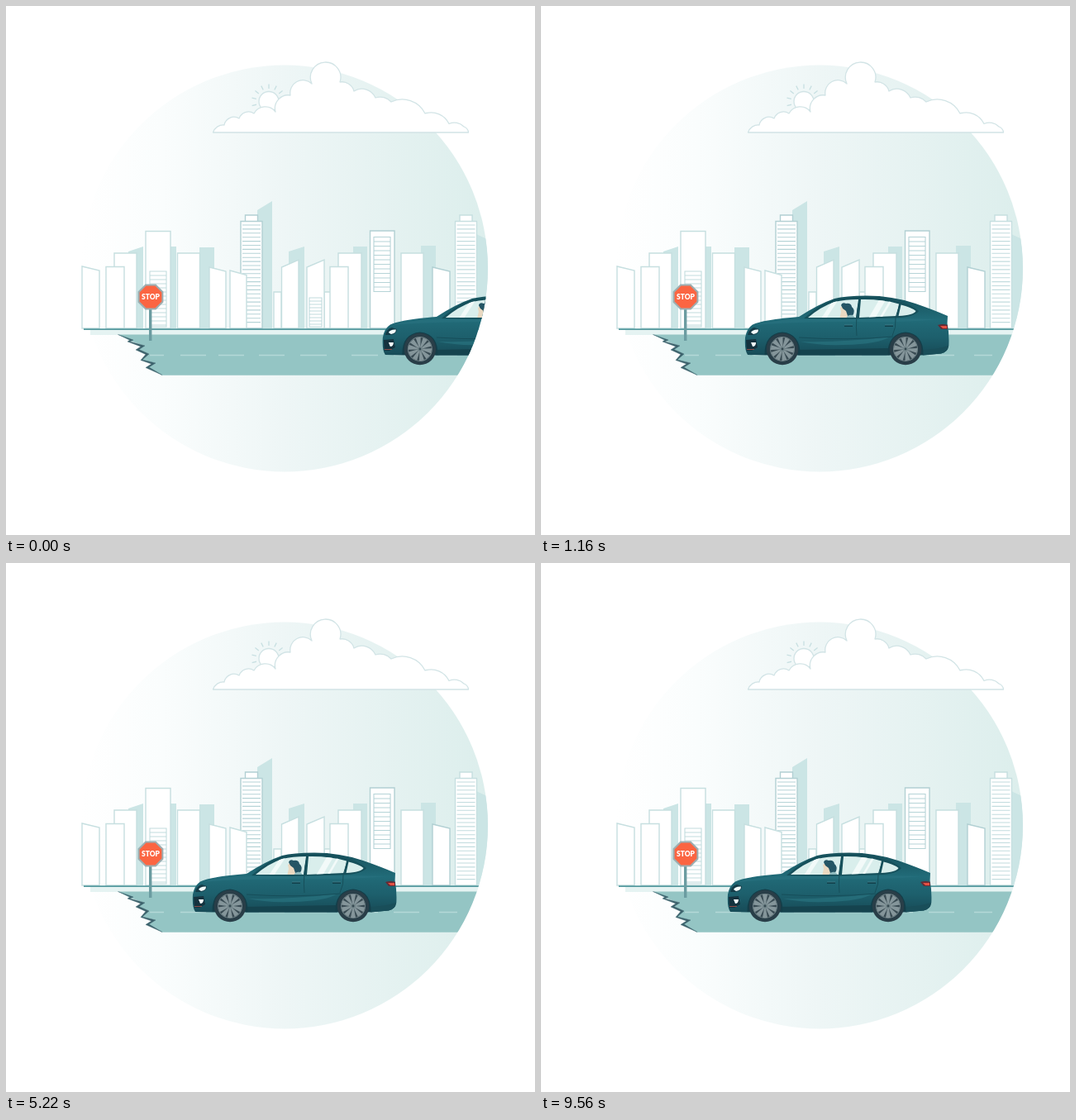
Write an HTML page that moves like this. It is 640x640 px and loops after 9580 ms.

```html
<!DOCTYPE html>
<html lang="en">
<head>
<meta charset="utf-8">
<title>Car at a broken road</title>
<style>
  html, body { margin: 0; width: 100%; height: 100%; overflow: hidden; background: #fff; }
  svg { display: block; width: 100vw; height: 100vh; }
  .block { fill: #fff; stroke: #c6dfe0; stroke-width: 1.4; }
  .bold .block { stroke: #b2d0d3; }
  .shade { fill: #cbe5e5; }
  .lines { fill: none; stroke: #c2dcde; stroke-width: 1.1; }
  .bold .lines { stroke: #b6d4d7; }
  .outline { fill: #fff; stroke: #d2e4e6; stroke-width: 1.3; stroke-linejoin: round; }
</style>
</head>
<body>
<svg viewBox="0 0 640 640">
  <defs>
    <clipPath id="disc"><circle cx="337" cy="317.5" r="246"/></clipPath>
    <clipPath id="ground">
      <circle cx="337" cy="317.500" r="246"/>
      <rect x="90" y="300" width="200" height="98"/>
    </clipPath>
    <linearGradient id="sky">
      <stop offset="0" stop-color="#fff"/>
      <stop offset=".2" stop-color="#fafdfd"/>
      <stop offset=".5" stop-color="#eef6f6"/>
      <stop offset="1" stop-color="#dceeec"/>
    </linearGradient>
    <linearGradient id="paint" x1="0" y1="0" x2="0" y2="1">
      <stop offset="0" stop-color="#17515c"/>
      <stop offset=".4" stop-color="#216b78"/>
      <stop offset=".7" stop-color="#1d5f6c"/>
      <stop offset="1" stop-color="#174b57"/>
    </linearGradient>
    <g id="wheel">
      <circle r="19.3" fill="#293e48"/>
      <circle r="15" fill="#6f8287"/>
      <circle r="14" fill="#394b53"/>
      <g class="spokes"></g>
      <circle r="3" fill="#718489"/>
      <circle r="1.4" fill="#34474f"/>
    </g>
    <clipPath id="glass">
      <path d="M302 377Q317 364 334 358Q347 355 363 355L360 377ZM366 355Q392 354.500 412 360.500L409 375L364 377ZM414.500 361.500Q426 364 432.500 369Q430 374 411.500 375Z"/>
    </clipPath>
  </defs>

  <rect x="90" y="70" width="494" height="496" fill="url(#sky)" clip-path="url(#disc)"/>
  <g clip-path="url(#ground)">
    <g id="city"></g>
    <rect x="102" y="391" width="482" height="7" fill="#e5f3f2"/>
    <path d="M94 391.200H584" stroke="#559a9f" stroke-width="1.7"/>
    <path d="M136 397.500H584V446.700H189L172 437L180 432L164 428L172 421L160 415L167 411L150 405Z" fill="#94c5c4"/>
    <path d="M174 422.500H191M211 422.500H242M257 422.500H288M306 422.500H337M356 422.500H388M418 422.500H450M469 422.500H500M524 422.500H546"
      stroke="#b4d8d7" stroke-width="1.3"/>
    <path d="M135.500 397.500L154 404L150 406L168 411L161 415.500L173 421L165 428L181 432L173 437L189 446.500L169 437.500L176 433L163 428.500L169 421.500L157 416L163 412L147 406L150 404Z"
      fill="#3c626c" stroke="#3c626c" stroke-width=".4"/>
  </g>

  <g id="sun">
    <circle class="outline" cx="318" cy="115.500" r="12"/>
    <path id="rays" fill="none" stroke="#c8e0e2" stroke-width="1.3"/>
  </g>
  <path class="outline" d="M250.500 153A13 13 0 0 1 264 144A12 12 0 0 1 282 136A12 12 0 0 1 300 130A15.500 15.500 0 0 1 326 128A16 16 0 0 1 344 108A15.500 15.500 0 0 1 370 94A18.300 18.300 0 1 1 404 92A15 15 0 0 1 421 103A18 18 0 0 1 447 111A18 18 0 0 1 466 116A31 31 0 0 1 507 130A24 24 0 0 1 536 142.500A16 16 0 0 1 554 146Q559 148 559.500 153Z"/>

  <rect x="173" y="366" width="3.400" height="39" fill="#6b9ca1"/>
  <path id="sign" fill="#fb6542" stroke="#9caeb1" stroke-width="2"/>
  <text x="175" y="355.200" text-anchor="middle" font-family="Lato, 'Open Sans', sans-serif" font-weight="900" font-size="8.500" fill="#fff">STOP</text>

  <g clip-path="url(#disc)">
    <g id="car">
      <path d="M229 422Q225 416 226 401Q228 390 235 385.500Q247 379.500 291 376Q315 360.500 334 354Q347 350.500 373 350.500Q404 350.500 432 360Q455 368 471 375L470.500 384Q473 396 472.300 411Q471 419 463 420.500L441 422.500H250Z" fill="url(#paint)"/>
      <path d="M286 416L399 414Q402 406 408 401L401 422.500H290Z" fill="#15434e"/>
      <path d="M238 386Q252 381 296 379Q383 377 459 379Q420 383 360 382Q280 382 238 386Z" fill="#2a7481" opacity=".55"/>
      <path d="M293 406Q350 407 401 400Q388 409 345 410Q315 411 293 406Z" fill="#2a7582" opacity=".65"/>
      <path d="M291 401Q350 405 405 400" fill="none" stroke="#164e5a" stroke-width="1"/>
      <path d="M297 378Q318 359 337 354.500Q372 349.500 404 355Q426 360 436 369Q432 375 414 377Q355 380 297 378Z" fill="#16505b"/>
      <g clip-path="url(#glass)">
        <rect x="300" y="352" width="136" height="28" fill="#d9eeec"/>
        <path d="M318 378L333 355H339L324 378ZM375 378L389 354H397L383 378ZM388 378L402 354H405L391 378Z" fill="#f2faf9"/>
        <path d="M340 379L342 370L341 365L345 362L351 366L351 379Z" fill="#ead9c1"/>
        <path d="M342 362Q343 358 348 360Q354 359 355 364Q359 367 357 373Q354 377 350 375L348 369L344 366Z" fill="#245565"/>
        <path d="M348 379Q349 373 356 374L361 379Z" fill="#8db9bd"/>
      </g>
      <path d="M364 356Q359 379 361 399M413 361L408 377Q409 389 404 399" fill="none" stroke="#174f5a" stroke-width="1"/>
      <path d="M346 387H356M395 387H405" stroke="#103f4a" stroke-width="2"/>
      <path d="M346 386H356M395 386H405" stroke="#4c8994" stroke-width=".7"/>
      <path d="M229 398Q230 391 237 389L243 391Q243 397 235 398Z" fill="#143b47"/>
      <path d="M233 395Q235 391 242 391.500Q242 396 236 397Z" fill="#f2fbfb"/>
      <path d="M227 404L239 403L241 413L234 417H228Z" fill="#15323e"/>
      <path d="M233 407L239 407Q239 412 235 412Z" fill="#f4fbfb"/>
      <path d="M228 415.500H237" stroke="#8b4e4b" stroke-width="1"/>
      <path d="M459 386Q465 384 471 386V391H463Z" fill="#642b35"/>
      <path d="M462 387H470V390H465Z" fill="#e35043"/>
      <path d="M441 416Q460 415 472 411Q471 419 463 420.500L441 422.500Z" fill="#194e59"/>
      <path d="M249.500 422Q249 396.500 271 394.500Q293 396.500 292.500 422ZM398.500 422Q398 396.500 420 394.500Q442 396.500 441.500 422Z" fill="#143e49"/>
      <use href="#wheel" x="271" y="415"/>
      <use href="#wheel" x="420" y="415"/>
    </g>
  </g>
</svg>
<script>
const LOOP = 9580, DRIVE = 1515, DISTANCE = 230, WHEEL_RADIUS = 19.5, BASE = 390;
const $ = selector => document.querySelector(selector);

const polygon = (cls, ...points) => `<path class="${cls}" d="M${points.join("L")}Z"/>`;
const slab = (cls, left, topLeft, right, topRight = topLeft) =>
  polygon(cls, [left, BASE], [left, topLeft], [right, topRight], [right, BASE]);
const white = (...args) => slab("block", ...args);
const shade = (...args) => slab("shade", ...args);
const bold = (...parts) => `<g class="bold">${parts.join("")}</g>`;

function stripes(left, right, top, bottom, gap) {
  let d = "";
  for (let y = top; y <= bottom; y += gap) d += `M${left} ${y}H${right}`;
  return `<path class="lines" d="${d}"/>`;
}
const panel = (left, right, top, bottom, gap) =>
  polygon("lines", [left, top], [right, top], [right, bottom], [left, bottom]) +
  stripes(left, right, top + gap, bottom - 1, gap);
const tower = left =>
  white(left + 5.5, 253, left + 20.5) + white(left, 260.5, left + 26) +
  stripes(left + 2, left + 24, 265, 386, 4.9);

$("#city").innerHTML = [
  shade(148, 297, 166, 291), shade(197, 291, 206), shade(234, 292, 252),
  shade(304, 247, 322, 236), shade(342, 297, 361, 291), shade(420, 291, 437),
  shade(502, 290, 520), shade(569, 276, 584, 283),
  white(92, 315, 113, 320), white(131, 299, 158), white(121, 315.5, 143),
  white(169, 272.5, 199), panel(174, 194, 321, 388, 5),
  white(207.5, 299, 234.5), bold(tower(284)),
  white(246, 316, 266, 321), white(271, 320, 291, 325.5),
  white(324, 346, 333), white(333.5, 316, 354, 307),
  white(385, 346, 394), white(364, 316, 385, 307), panel(367, 382, 353, 388, 4),
  white(402, 299, 430), white(392, 315.5, 414),
  bold(white(440.5, 272, 470), panel(445, 465, 279.5, 345.5, 5.5)),
  white(478, 299, 505), bold(white(516, 316, 537, 321)), tower(543.5)
].join("");

const polar = (cx, cy, radius, degrees) => {
  const a = degrees * Math.PI / 180;
  return `${(cx + radius * Math.cos(a)).toFixed(2)} ${(cy + radius * Math.sin(a)).toFixed(2)}`;
};

let rays = "";
for (let a = 166; a <= 322; a += 26)
  rays += `M${polar(318, 115.5, 15.5, a)}L${polar(318, 115.5, 21, a)}`;
$("#rays").setAttribute("d", rays);

const corners = Array.from({ length: 8 }, (_, i) => polar(175, 352, 15.6, 22.5 + 45 * i));
$("#sign").setAttribute("d", `M${corners.join("L")}Z`);

const spokes = $(".spokes");
for (let i = 0; i < 10; i++)
  spokes.innerHTML += `<path d="M-.8 -2L-3 -14H3L.8 -2Z" fill="#84959a" transform="rotate(${i * 36})"/>`;

// Steady speed at first, braking smoothly to a stop.
function remaining(time) {
  const s = Math.min(time / DRIVE, 1);
  return DISTANCE * (1 - s) ** 2 * (1 + 0.88 * s);
}

function draw(time) {
  const x = remaining(time);
  $("#car").setAttribute("transform", `translate(${x.toFixed(2)} 0)`);
  spokes.setAttribute("transform", `rotate(${(x / WHEEL_RADIUS * 180 / Math.PI).toFixed(2)})`);
}

const start = performance.now();
function tick() {
  draw((performance.now() - start) % LOOP);
  requestAnimationFrame(tick);
}
tick();
</script>
</body>
</html>
```
